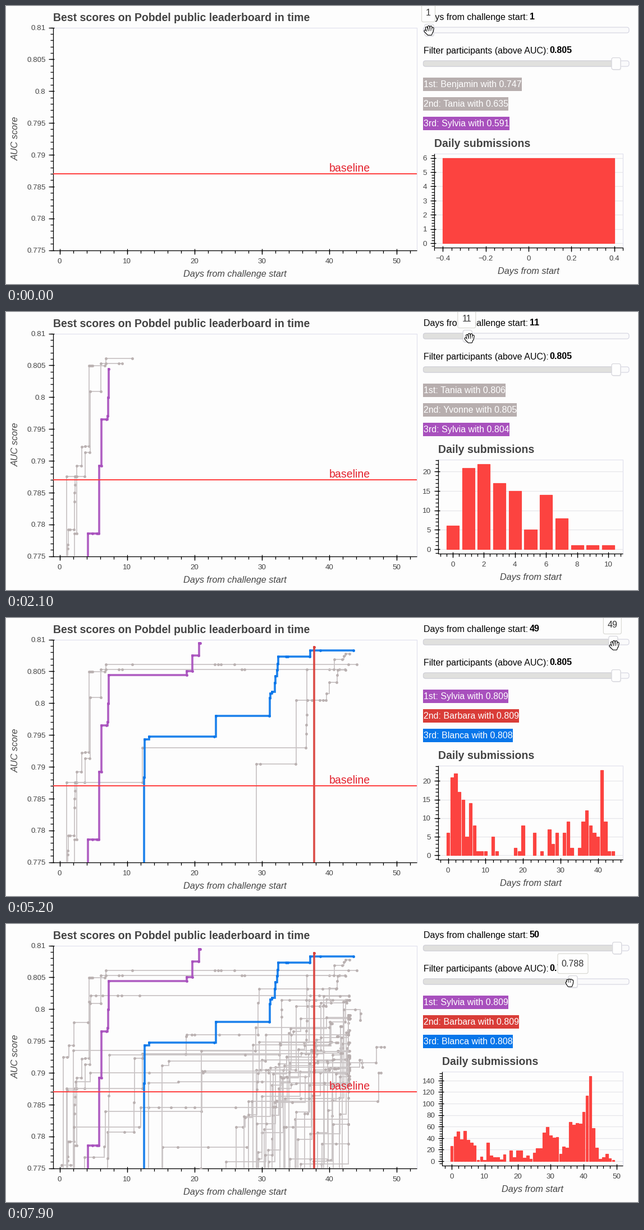
Write a matplotlib script that moves like this. It is 1126 px wide and 497 px high and loops after 8 s.

```python
import math
import random

import matplotlib.pyplot as plt
import numpy as np
from matplotlib.animation import FuncAnimation
from matplotlib.patches import FancyBboxPatch, Polygon, Rectangle

W, H, DPI = 1126, 497, 64
FRAMES, STEP_MS = 80, 100
PT = 72 / DPI  # points per pixel

PAPER, INK, GREY_TEXT = "#fdfdfd", "#000000", "#444444"
OUTLINE, GRID = "#e2e2ee", "#e6e6ea"
GREY, GREY_LINE = "#b7aeae", "#cac5c6"
PURPLE, BLUE, RED, BAR = "#a850bd", "#0876ea", "#d93d38", "#fc4340"

MAIN = (83.5, 38.5, 732, 436.5)
MAIN_X, MAIN_Y = (-1, 53), (0.775, 0.81)

plt.rcParams["font.family"] = "Liberation Sans"
fig = plt.figure(figsize=(W / DPI, H / DPI), dpi=DPI, facecolor=PAPER)
back = fig.add_axes([0, 0, 1, 1])
front = fig.add_axes([0, 0, 1, 1])


def reset(ax):
    ax.clear()
    ax.set_xlim(0, W)
    ax.set_ylim(H, 0)
    ax.axis("off")


# ---- drawing helpers -------------------------------------------------

def write(ax, x, y, s, size, color=INK, **kw):
    return ax.text(x, y, s, fontsize=size * PT, color=color,
                   va="baseline", **kw)


def segments(ax, pairs, color, width, z=2):
    """Draw many separate line segments as one artist."""
    xs, ys = [], []
    for x0, y0, x1, y1 in pairs:
        xs += [x0, x1, math.nan]
        ys += [y0, y1, math.nan]
    ax.plot(xs, ys, color=color, lw=width * PT, zorder=z,
            solid_capstyle="butt")


def round_box(ax, x0, y0, x1, y1, r, face, edge, z, width=1.2):
    ax.add_patch(FancyBboxPatch(
        (x0, y0), x1 - x0, y1 - y0, boxstyle=f"round,pad=0,rounding_size={r}",
        fc=face, ec=edge, lw=width * PT, zorder=z))


def nice_step(span):
    """Tick interval of 1, 2 or 5 times a power of ten, near six ticks."""
    base = 10 ** math.floor(math.log10(span / 6))
    return min((base * m for m in (1, 2, 5, 10)),
               key=lambda s: abs(6 - span / s))


def ticks(lo, hi, step):
    first, last = math.ceil(lo / step - 1e-6), math.floor(hi / step + 1e-6)
    return [round(k * step, 8) for k in range(first, last + 1)]


def scale(lo, hi, p0, p1):
    return lambda v: p0 + (v - lo) / (hi - lo) * (p1 - p0)


def chart(ax, box, xlim, ylim, title, xlabel, grid=False):
    left, top, right, bottom = box
    sx, sy = scale(*xlim, left, right), scale(*ylim, bottom, top)
    xstep, ystep = nice_step(xlim[1] - xlim[0]), nice_step(ylim[1] - ylim[0])
    xmajor, ymajor = ticks(*xlim, xstep), ticks(*ylim, ystep)

    if grid:
        segments(ax, [(left, sy(v), right, sy(v)) for v in ymajor],
                 GRID, 1.25, 0.5)
    segments(ax, [(left, top, right, top), (right, top, right, bottom)],
             OUTLINE, 1.25, 0.6)

    lines = [(left, top, left, bottom), (left, bottom, right, bottom)]
    lines += [(sx(v), bottom - 2.5, sx(v), bottom + 7.5) for v in xmajor]
    lines += [(left - 7.5, sy(v), left + 2.5, sy(v)) for v in ymajor]
    lines += [(sx(v), bottom, sx(v), bottom + 5)
              for v in ticks(*xlim, xstep / 5)]
    lines += [(left - 5, sy(v), left, sy(v)) for v in ticks(*ylim, ystep / 5)]
    segments(ax, lines, INK, 1.3)

    for v in xmajor:
        write(ax, sx(v), bottom + 23.5, f"{v:g}".replace("-", "−"), 13.33,
              GREY_TEXT, ha="center")
    for v in ymajor:
        write(ax, left - 13, sy(v) + 4.8, f"{v:g}", 13.33, GREY_TEXT,
              ha="right")
    write(ax, left, top - 11.5, title, 19.5, GREY_TEXT, weight="bold")
    write(ax, (left + right) / 2, bottom + 47.5, xlabel, 16.25, GREY_TEXT,
          ha="center", style="italic")
    return sx, sy


# ---- score curves: (day, score in thousandths) -----------------------

curves = []


def add(name, color, *points):
    curves.append((name, color, points, max(p[1] for p in points)))


def flat(score, *days):
    return [(d, score) for d in days]


add("Tania", GREY, (0.6, 635), (1.2, 776.2), (1.2, 776.8),
    *flat(779.2, 1.3, 1.5, 2.1), (2.2, 783.6), (2.2, 785), (2.25, 786.2),
    (2.3, 787.5), *flat(789.2, 2.5, 3.2), (3.25, 792.2),
    *flat(792.3, 3.8, 4.35), *flat(804.9, 4.35, 4.6, 4.9, 6.7),
    *flat(806.1, 6.9, 10.8, 23.05, 23.5, 23.9, 25.95, 42.8, 44.1))
add("Yvonne", GREY, *flat(778.6, 2.2, 2.5), *flat(787.5, 2.5, 3.7),
    *flat(791.3, 3.75, 4.45), *flat(800.9, 4.5, 6.1),
    *flat(805.3, 6.1, 6.9, 8.8, 9.25, 27, 27.4, 40, 41.5, 42.3))
add("Benjamin", GREY, (0.3, 747), *flat(787.5, 1.05, 2.3, 12.25),
    *flat(793, 12.3, 36.5), (36.6, 795.2), (36.6, 796.6), (36.7, 798.2),
    *flat(805.3, 36.7, 40.7), *flat(806.9, 40.8, 41.9), (42.2, 807.4),
    *flat(807.8, 42.4, 43))
add("", GREY, *flat(790.4, 29.2, 29.8, 35),
    *flat(800.5, 35.1, 36.8, 37.4, 38.6, 39.1, 39.5), (39.6, 801.5),
    *flat(803.3, 40, 41.1), (41.2, 804.4), *flat(805.2, 41.3, 42.4))

# strong field, hidden until the filter is lowered
add("", GREY, *flat(792.5, 0.55, 1.1), *flat(794.3, 1.4, 2),
    *flat(797.9, 2.1, 4.2), (4.4, 801.2),
    *flat(802.1, 4.6, 5.4, 6.4, 8.6, 9.2, 11.9, 37.2, 38.5, 42.9))
add("", GREY, *flat(793.5, 2, 38.2, 38.8), *flat(801, 38.8, 40.3, 42.6))
add("", GREY, *flat(780.7, 7.1, 9.6, 11), (11.05, 785.3),
    *flat(792.3, 11.1, 12.3), *flat(792.9, 12.4, 18.7), (18.75, 795.7),
    *flat(796, 18.9, 19.6, 20, 23.7, 26.6, 29.4), (29.45, 801),
    *flat(803.2, 29.6, 31.9, 36.8, 39, 41))
add("", GREY, (7.1, 776.5), (7.25, 786.4), *flat(792.8, 7.4, 27.5, 32.6),
    *flat(794.7, 32.7, 36.3), *flat(801.4, 37, 38, 40.2, 43))
add("", GREY, *flat(794.4, 28.7, 32.8, 40), *flat(798, 40.1, 42.3),
    *flat(801.4, 42.4, 42.9))
add("", GREY, (32.7, 794.5), (32.9, 798.8), (32.9, 799.9),
    *flat(801.4, 32.9, 34.1, 36.6, 40.5, 42.7))
add("", GREY, (39.2, 800.6), *flat(802, 39.2, 41.6, 42.9))
add("", GREY, *flat(776.3, 39.8, 40.3), (40.4, 783.2), (40.5, 792.8),
    *flat(793.9, 41.7, 42), *flat(801.2, 42.1, 42.5))

# wider field
add("", GREY, *flat(775.5, 0.3, 1.6), *flat(781.5, 2.1, 11.8),
    *flat(784.5, 12, 13.2, 14.7, 16.5, 18.7, 20, 26.1), *flat(788.4, 33, 42))
add("", GREY, *flat(776.7, 3.7, 5), (6.6, 778.4),
    *flat(783.9, 6.8, 21), *flat(790.3, 21.1, 21.5), *flat(792, 30, 42.5))
add("", GREY, (1.1, 787.3), (2.4, 788.6), *flat(790, 4.5, 13.3, 21.3, 31, 41.2))
add("", GREY, (13.2, 788.4), *flat(788.6, 17.6, 30, 34),
    *flat(791.6, 34.2, 44.8, 46.9), *flat(794, 47, 47.7, 48.2))
add("", GREY, *flat(778.3, 15.3, 17.5, 22, 27.8), (28, 785.5),
    *flat(790.9, 32, 42.8), (44.5, 792), (44.9, 790.9))
add("", GREY, (15.2, 791.1), *flat(791.8, 16.2, 30.5), *flat(796, 30.6, 42.5))
add("", GREY, (20.9, 775), *flat(793.4, 21, 29), *flat(797.1, 29.1, 40))
add("", GREY, *flat(781.5, 26.2, 27.2), (27.5, 783), *flat(785.5, 28.5, 47.2),
    *flat(790, 47.3, 47.7))
add("", GREY, (41.5, 786), *flat(799.9, 42.2, 43.8), (44.6, 798.3),
    (44.7, 799.3))

rng = random.Random(11)
for _ in range(27):
    day = min(42, max(24, rng.gauss(33.5, 5)))
    score, top = rng.uniform(773, 784), rng.uniform(788.2, 799.4)
    points = []
    for _ in range(rng.randint(4, 9)):
        points.append((day, score))
        day = min(42.8, day + rng.expovariate(0.5))
        if rng.random() < 0.7:
            score += (top - score) * rng.uniform(0.1, 0.9)
    end = max(day, rng.uniform(40, 43))
    add("", GREY, *points, (day, top), (end, top), (end + 0.2, top))

add("Sylvia", PURPLE, (0.4, 591), *flat(778.6, 4.2, 4.9, 5.5, 5.8),
    *flat(789.2, 5.9, 6.2), *flat(796.5, 6.2, 6.95), (7.1, 797), (7.2, 799.9),
    *flat(804.4, 7.27, 18.85), *flat(805, 18.9, 19.7),
    *flat(807.5, 19.7, 20.6), *flat(809.4, 20.65, 20.85))
add("Blanca", BLUE, (12.55, 788.3), (12.65, 794.3),
    *flat(794.7, 13.3, 22.95), *flat(798, 23.2, 31.1), (31.2, 800.8),
    (31.3, 801.5), (31.55, 801.8), (31.9, 803.2), (32.05, 804.2),
    (32.3, 805.2), (32.35, 806.2), *flat(807.3, 32.4, 33.6, 33.85, 37.1),
    *flat(808.3, 37.15, 38.7, 43.6))
add("Barbara", RED, (37.76, 808.8))

# ---- daily submissions at three filter levels ------------------------

AT_805 = np.array([6, 21, 22, 17, 15, 5, 14, 8, 1, 1, 1, 0, 5, 1, 0, 0, 0, 0,
                   2, 1, 8, 0, 0, 6, 0, 1, 0, 7, 3, 6, 0, 6, 9, 2, 0, 2, 9,
                   12, 8, 6, 5, 23, 9, 1, 1, 0, 0, 0, 0, 0])
AT_800 = np.array([11, 36, 27, 17, 32, 24, 20, 22, 2, 5, 1, 14, 6, 1, 0, 0, 0,
                   0, 8, 6, 11, 0, 0, 6, 0, 3, 3, 10, 10, 11, 0, 7, 25, 4, 0,
                   3, 15, 25, 20, 12, 27, 41, 35, 4, 1, 0, 0, 0, 0, 0])
AT_788 = np.array([26, 43, 51, 38, 52, 37, 32, 27, 2, 8, 2, 32, 10, 7, 7, 3,
                   12, 0, 18, 7, 18, 18, 6, 10, 4, 14, 22, 22, 49, 59, 45, 41,
                   42, 13, 25, 23, 68, 63, 66, 65, 85, 114, 148, 57, 23, 4, 7,
                   13, 5, 2])


def daily_counts(cut):
    if cut >= 800:
        a, b, w = AT_805, AT_800, (805 - cut) / 5
    else:
        a, b, w = AT_800, AT_788, (800 - cut) / 12
    return np.rint(a + (b - a) * w).astype(int)


# ---- motion ----------------------------------------------------------

def day_at(t):
    return int(np.interp(t, [1.15, 2.0, 2.1, 4.0, 5.2, 5.4],
                         [1, 11.05, 11.3, 36.4, 49.2, 50]))


def cut_at(t):
    return round(float(np.interp(t, [6.05, 6.6, 7.9], [805, 800, 788])))


def cursor_at(t):
    keys = [0, 0.9, 1.15, 2.1, 4.0, 5.2, 5.4, 5.6, 5.9, 6.05, 6.6, 7.9]
    xs = [754, 754, 757, 826, 995, 1084, 1091, 1091, 1086, 1084, 1060, 1004]
    ys = [44, 44, 45, 47, 51, 49, 49, 50, 102, 104, 104, 104]
    return np.interp(t, keys, xs), np.interp(t, keys, ys)


# ---- moving parts ----------------------------------------------------

def draw_curves(day, cut):
    sx, sy = scale(*MAIN_X, MAIN[0], MAIN[2]), scale(*MAIN_Y, MAIN[3], MAIN[1])
    left, top, right, bottom = MAIN
    clip = Rectangle((left, top), right - left, bottom - top,
                     transform=front.transData)
    for _, color, points, best in curves:
        seen = [p for p in points if p[0] <= day]
        if best < cut or not seen:
            continue
        seen.insert(0, (seen[0][0], 500))
        plain = color == GREY
        line, = front.plot(
            [sx(d) for d, _ in seen], [sy(s / 1000) for _, s in seen],
            drawstyle="steps-post", color=GREY_LINE if plain else color,
            lw=(2 if plain else 3.7) * PT, marker="o", ms=5 * PT, mew=0,
            mfc=color, alpha=0.9, solid_joinstyle="miter")
        line.set_clip_path(clip)
    segments(front, [(left, 300, right, 300)], "#ff4040", 2)
    write(front, 576, 296, "baseline", 19.5, "#e3202c", zorder=4)


def draw_ranking(day):
    table = []
    for name, color, points, _ in curves:
        scores = [s for d, s in points if d <= day]
        if name and scores:
            table.append((max(scores), name, color))
    table.sort(reverse=True)
    for i, (score, name, color) in enumerate(table[:3]):
        place = ("1st", "2nd", "3rd")[i]
        label = write(front, 743.5, 145 + 35 * i,
                      f"{place}: {name} with {score / 1000:.3f}", 16, "white")
        extent = label.get_window_extent()
        width = extent.transformed(front.transData.inverted()).width
        front.add_patch(Rectangle((743, 128 + 35 * i), width + 1, 23.5,
                                  fc=color, lw=0))


def draw_daily(day, cut):
    counts = daily_counts(cut)[:day]
    last, peak = int(np.flatnonzero(counts)[-1]), int(counts.max())
    span = last + 0.8
    xlim = -0.4 - span * 0.05, last + 0.4 + span * 0.05
    ylim = -0.05 * peak, 1.05 * peak
    left = 756 + 7 * len(str(peak))
    sx, sy = chart(front, (left, 264, 1099, 431.5), xlim, ylim,
                   "Daily submissions", "Days from start", grid=True)
    for k, n in enumerate(counts):
        if n:
            x0, x1 = sx(k - 0.4), sx(k + 0.4)
            front.add_patch(Rectangle((x0, sy(n)), x1 - x0, sy(0) - sy(n),
                                      fc=BAR, ec=BAR, lw=1.2 * PT))


def draw_slider(y, x, label, value, value_x):
    write(front, 743.5, y - 18.5, label, 16)
    write(front, value_x, y - 18.5, value, 16, weight="bold")
    round_box(front, 743.5, y - 5, 1110, y + 5, 4, "#fafafb", "#d6d6e2", 1)
    if x > 760:
        round_box(front, 743.5, y - 5, x, y + 5, 4, "#e0e0de", "#d2d2d8", 1.1)
    round_box(front, x - 7, y - 9, x + 9, y + 12, 3, "#ececf0", "none", 1.2)
    round_box(front, x - 8, y - 10.5, x + 8, y + 10.5, 3, "#fefefe",
              "#d6d6dc", 1.3)


def draw_tip(x, y0, y1, s, half):
    round_box(front, x - half, y0, x + half, y1, 3, "#fefefe", "#d9d9d4", 5)
    write(front, x, (y0 + y1) / 2 + 5.5, s, 16, "#333333", ha="center",
          zorder=6)


OPEN = [(-3, 2, -4.8, -5), (0, 1, -0.9, -7), (3, 1, 3.1, -6.6),
        (5.3, 2, 6.5, -4), (-3.5, 5, -7.3, 0.6)]
CLOSED = [(-3, 1, -3.8, -3), (0, 1, -0.6, -4), (3, 1, 2.6, -3.8),
          (4.6, 2, 5.2, -2.4), (-3, 4, -5.2, 1)]
PALM = [(-4, 1), (5.6, 1), (5.3, 4), (3.8, 7.6), (-2.4, 7.6), (-5, 3.6)]


def draw_hand(x, y, fingers):
    palm = [(x + dx, y + dy) for dx, dy in PALM]
    for color, finger, edge, z in ((INK, 4.6, 2.2, 8), ("white", 2.3, 0, 9)):
        front.add_patch(Polygon(palm, fc=color, ec=color, lw=edge * PT,
                                joinstyle="round", zorder=z))
        for x0, y0, x1, y1 in fingers:
            front.plot([x + x0, x + x1], [y + y0, y + y1], color=color,
                       lw=finger * PT, solid_capstyle="round", zorder=z)


def draw(i):
    t = i * STEP_MS / 1000
    day, cut = day_at(t), cut_at(t)
    day_x, cut_x = 754 + 6.83 * (day - 1), 1087 + 4.53 * (cut - 805)
    reset(front)
    draw_curves(day, cut)
    draw_slider(43, day_x, "Days from challenge start:", str(day), 932.5)
    draw_slider(103, cut_x, "Filter participants (above AUC):",
                f"{cut / 1000:.3f}", 968.5)
    draw_ranking(day)
    draw_daily(day_at(t - 0.1), cut)  # the bars trail the slider a little
    if t < 5.5:
        draw_tip(day_x - 1.5, -5, 28.5, str(day), 12 if day < 10 else 16)
    elif t >= 6:
        draw_tip(cut_x, 53, 88.5, f"{cut / 1000:.3f}", 27)
    draw_hand(*cursor_at(t), OPEN if t < 6 else CLOSED)
    return []


reset(back)
chart(back, MAIN, MAIN_X, MAIN_Y,
      "Best scores on Pobdel public leaderboard in time",
      "Days from challenge start")
write(back, 22, 237, "AUC score", 16.25, GREY_TEXT, ha="center",
      style="italic", rotation=90, rotation_mode="anchor")

anim = FuncAnimation(fig, draw, frames=FRAMES, interval=STEP_MS,
                     init_func=lambda: [], repeat=True, repeat_delay=0)
plt.show()
```
